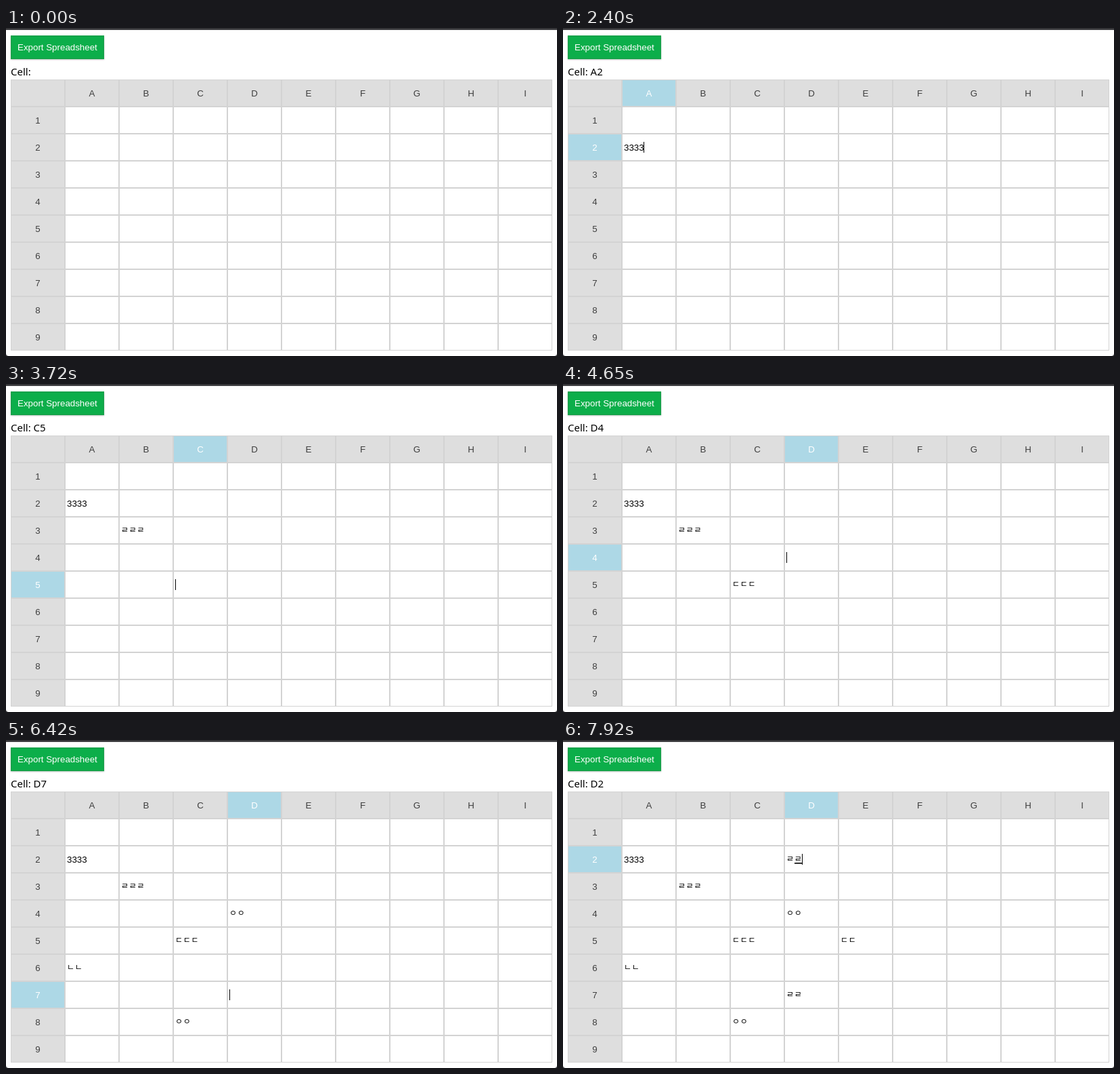
These frames come from a looping animation (814x484 px, 8 s). An HTML page:

```html
<!DOCTYPE html>
<html lang="ko">
<head>
<meta charset="utf-8">
<title>Spreadsheet</title>
<style>
  html, body { margin: 0; width: 100%; height: 100%; overflow: hidden; background: #fff; }
  svg { display: block; width: 814px; height: 484px; }
  text { font: 13.333px "Liberation Sans", Arial, sans-serif; white-space: pre; }
  .cell { fill: #fff; stroke: #d3d3d3; }
  .head { fill: #dedede; stroke: #d3d3d3; }
  .name { fill: #3f3f3f; text-anchor: middle; }
  .on .head { fill: #add8e6; }
  .on .name { fill: #fff; }
  .label { font: 15px "Noto Sans", "Open Sans", sans-serif; }
  .jamo { font: 12px "Noto Sans CJK KR", "Noto Sans CJK", "Noto Sans CJK JP", sans-serif; letter-spacing: .7px; }
</style>
</head>
<body>
<svg id="stage" viewBox="0 0 814 484">
  <defs>
    <filter id="soft" x="-5%" y="-20%" width="110%" height="150%"><feGaussianBlur stdDeviation="1.2"/></filter>
  </defs>
  <rect width="814" height="484" fill="#353538"/>
  <path d="M0 3H814V480Q814 484 810 484H4Q0 484 0 480Z" fill="#fff"/>
  <rect y="2" width="814" height="1" fill="#4c4c4f"/>
  <rect x="7" y="12" width="138" height="35" fill="#000" opacity=".22" filter="url(#soft)"/>
  <rect x="7" y="11" width="138" height="35" fill="#0cae4a"/>
  <rect x="8" y="12" width="136" height="33" fill="none" stroke="#16a34a" stroke-width="2"/>
  <text x="17" y="33" fill="#fff">Export Spreadsheet</text>
  <text id="label" class="label" x="7" y="70">Cell:</text>
  <g id="grid"></g>
  <rect id="line" height="1.6"/>
  <rect id="caret" width="1" height="16"/>
  <path id="beam" d="M.8 .7Q3.5 .7 3.5 3V13Q3.5 15.3 .8 15.3M6.2 .7Q3.5 .7 3.5 3V13Q3.5 15.3 6.2 15.3M2.2 10.5H4.8"
        fill="none" stroke="#000"/>
</svg>
<script>
const LOOP = 8000, LEFT = 7, TOP = 76, W = 80, H = 40, JAMO = 11.74, DIGIT = 7.415;
const COLS = 'ABCDEFGHI';
const $ = id => document.getElementById(id);
const [grid, label, caret, line, beam] = ['grid', 'label', 'caret', 'line', 'beam'].map($);

function add(parent, tag, attrs, text = '') {
  const el = document.createElementNS('http://www.w3.org/2000/svg', tag);
  for (const key in attrs) el.setAttribute(key, attrs[key]);
  el.textContent = text;
  return parent.appendChild(el);
}

const place = (el, x, y) => { el.setAttribute('x', x); el.setAttribute('y', y); };
const show = (el, on) => { el.style.display = on ? '' : 'none'; };
const colX = i => LEFT + W * i;
const rowY = j => TOP + H * j;
const spot = id => ({ x: colX(COLS.indexOf(id[0]) + 1) + 3, y: rowY(+id[1]) + H / 2 });

const heads = {};
for (let j = 0; j < 10; j++) {
  for (let i = 0; i < 10; i++) {
    const isHead = !i || !j;
    const name = i ? COLS[i - 1] : j || '';
    const g = add(grid, 'g', {});
    add(g, 'rect', { class: isHead ? 'head' : 'cell', x: colX(i) + .5, y: rowY(j) + .5, width: W - 1, height: H - 1 });
    if (isHead && name) {
      add(g, 'text', { class: 'name', x: colX(i) + W / 2, y: rowY(j) + 25 }, name);
      heads[name] = g;
    }
  }
}

// Each entry: time, action, value
const events = [
  [1170, 'go', 'A2'], [1170, 'caret', true], [1620, 'caret', false],
  [1890, 'type', '3'], [2100, 'type', '3'], [2250, 'type', '3'], [2400, 'type', '3'],
  [2430, 'beam', '133,169'], [2490, 'beam', ''],
  [2820, 'go', 'B3'], [2910, 'caret', true],
  [3180, 'type', 'ㄹ'], [3270, 'type', 'ㄹ'], [3420, 'type', 'ㄹ'], [3600, 'commit'],
  [3660, 'go', 'C5'], [3720, 'caret', true],
  [3960, 'type', 'ㄷ'], [4110, 'type', 'ㄷ'], [4200, 'type', 'ㄷ'],
  [4230, 'beam', '305,279'], [4260, 'beam', ''],
  [4560, 'go', 'D4'], [4620, 'caret', true], [4680, 'type', 'ㅇ'], [4830, 'type', 'ㅇ'],
  [5250, 'go', 'A6'], [5310, 'caret', true], [5370, 'type', 'ㄴ'], [5520, 'type', 'ㄴ'],
  [5790, 'go', 'C8'], [5850, 'caret', true], [5910, 'type', 'ㅇ'], [6060, 'type', 'ㅇ'],
  [6330, 'go', 'D7'], [6420, 'caret', true], [6480, 'type', 'ㄹ'], [6600, 'type', 'ㄹ'],
  [6750, 'beam', '386,350'], [6780, 'beam', ''],
  [6930, 'go', 'E5'], [7020, 'caret', true], [7110, 'type', 'ㄷ'], [7260, 'type', 'ㄷ'],
  [7650, 'go', 'D2'], [7680, 'caret', true], [7740, 'type', 'ㄹ'], [7920, 'type', 'ㄹ']
];

const actions = {
  go(s, id) { s.cell = id; s.texts[id] = ''; s.caret = s.live = false; },
  caret(s, on) { s.caret = on; },
  type(s, ch) { s.texts[s.cell] += ch; s.caret = true; s.live = ch !== '3'; },
  commit(s) { s.live = false; },
  beam(s, at) { s.beam = at; }
};

const entries = {};
for (const [, action, id] of events) {
  if (action !== 'go') continue;
  const { x, y } = spot(id);
  const digits = id === 'A2';
  entries[id] = add(grid, 'text', { class: digits ? '' : 'jamo', x, y: y + (digits ? 5 : 3.6) });
}

function render(count) {
  const s = { cell: '', texts: {}, caret: false, live: false, beam: '' };
  for (const [, action, value] of events.slice(0, count)) actions[action](s, value);

  label.textContent = 'Cell: ' + s.cell;
  for (const name in heads) heads[name].classList.toggle('on', s.cell.includes(name));
  for (const id in entries) entries[id].textContent = s.texts[id] || '';

  show(caret, s.caret);
  show(line, s.live);
  show(beam, s.beam);
  if (s.beam) beam.setAttribute('transform', `translate(${s.beam})`);
  if (!s.cell) return;

  const { x, y } = spot(s.cell);
  const step = s.cell === 'A2' ? DIGIT : JAMO;
  const end = Math.floor(x + step * s.texts[s.cell].length);
  place(caret, end, y - 8);
  place(line, end - 11, y + 5);
  line.setAttribute('width', 11);
}

let last = -1;
function tick() {
  const t = performance.now() % LOOP;
  const count = events.filter(e => e[0] <= t).length;
  if (count !== last) render(last = count);
  requestAnimationFrame(tick);
}
tick();
</script>
</body>
</html>
```
